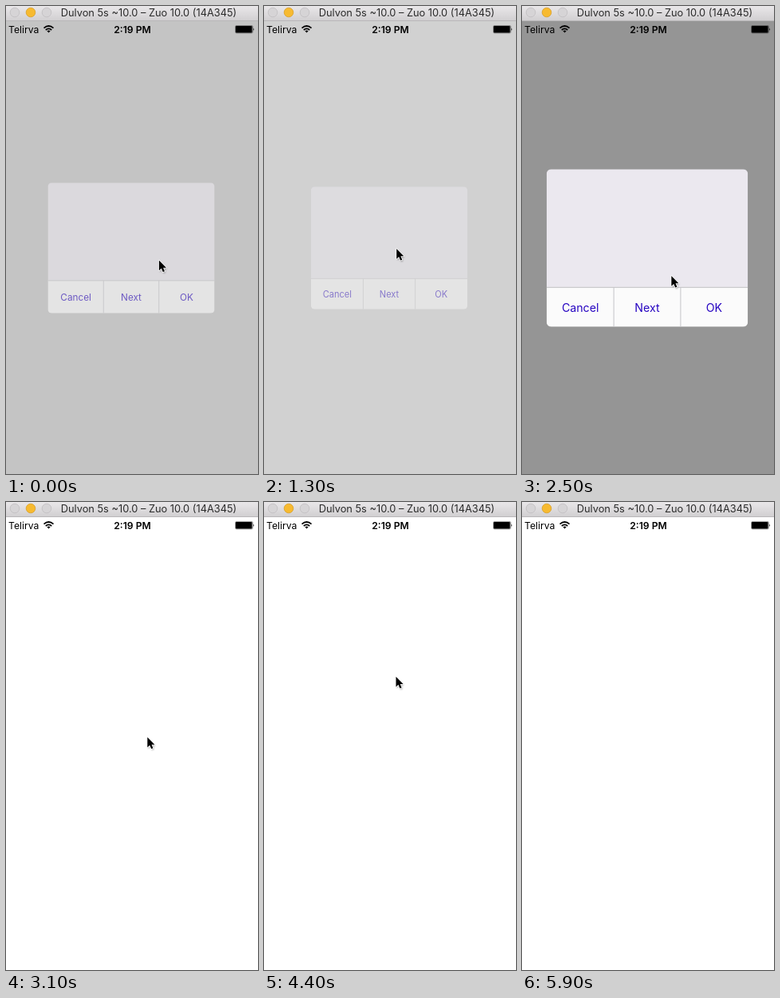
An HTML page for the animation above (6000 ms loop, 316 px wide and 586 px high).

```html
<!DOCTYPE html>
<html lang="en">
<head>
<meta charset="utf-8">
<title>Popup dialog</title>
<style>
html, body { margin: 0; width: 100%; height: 100%; overflow: hidden; background: #fff; }
svg { display: block; width: 316px; height: 586px; }
text { font-family: Inter, Roboto, sans-serif; text-anchor: middle; }
</style>
</head>
<body>
<svg viewBox="0 0 316 586">
  <defs>
    <linearGradient id="bar" x2="0" y2="1">
      <stop offset="0" stop-color="#e9e7e9"/>
      <stop offset="1" stop-color="#d0ced0"/>
    </linearGradient>
    <filter id="soft" x="-50%" y="-50%" width="200%" height="200%">
      <feGaussianBlur stdDeviation="1"/>
    </filter>
    <clipPath id="round"><rect x="-128" y="-100" width="256" height="200" rx="6"/></clipPath>
    <path id="arrow" d="M.5 .8V13.5L3.4 10.8L5.4 15.3L7.6 14.4L5.7 10H9.6Z"/>
  </defs>

  <rect width="316" height="586" fill="#fff"/>
  <rect id="dim" y="19" width="316" height="567"/>

  <g id="card">
    <g clip-path="url(#round)">
      <rect x="-128" y="-100" width="256" height="150" fill="#efecf3"/>
      <rect x="-128" y="50" width="256" height="50" fill="#fff"/>
      <path d="M-128 50H128M-42.5 50V100M42.5 50V100" stroke="#c6c6ca"/>
    </g>
    <g id="labels" font-size="14.4" fill="#2400c4"></g>
  </g>

  <rect width="316" height="19" fill="url(#bar)"/>
  <path d="M0 18.5H316" stroke="#b9b7b9"/>
  <g fill="#d6d4d6" stroke="#c0bec0" stroke-width=".8">
    <circle cx="11" cy="8" r="5.8"/>
    <circle cx="31" cy="8" r="5.8" fill="#f7ba30" stroke="#d9a02a"/>
    <circle cx="51" cy="8" r="5.8"/>
  </g>
  <text x="179" y="13" font-size="12.8" fill="#2a2a2a">Dulvon 5s ~10.0 – Zuo 10.0 (14A345)</text>

  <text x="3" y="34" font-size="12.2" style="text-anchor:start">Telirva</text>
  <g fill="none" stroke="#000" stroke-width="1.7">
    <path d="M47.5 27.6Q53.5 22.4 59.5 27.6M49.8 30Q53.5 26.8 57.2 30"/>
    <path d="M51.4 31.3Q53.5 29.6 55.6 31.3L53.5 33.6Z" fill="#000" stroke="none"/>
  </g>
  <text x="158.5" y="34" font-size="12.2" font-weight="600">2:19 PM</text>
  <rect x="287.5" y="24.5" width="22" height="9.4" rx="1.5" fill="none" stroke="#000" stroke-opacity=".45" stroke-width=".8"/>
  <rect x="288" y="25" width="20.6" height="8.4" rx=".8"/>
  <path d="M310.3 27.4Q312 29.2 310.3 31Z"/>

  <g id="cursor">
    <use href="#arrow" x="1" y="1.6" opacity=".4" filter="url(#soft)"/>
    <use href="#arrow" stroke="#fff" stroke-width="1.6" stroke-linejoin="round"/>
    <use href="#arrow"/>
  </g>
</svg>
<script>
const LOOP = 6000, STEP = 100, FADE = 180, TRAVEL = 300, CURSOR_END = 5600;
const $ = id => document.getElementById(id);

// Each showing of the dialog: when it opens and closes, and where the pointer taps
const shows = [
  { open: -95, close: 885, from: [180, 305], to: [228, 359] },
  { open: 1220, close: 2020, from: [155, 285], to: [216, 389] },
  { open: 2340, close: 2920, from: [150, 285], to: [217, 380] },
  { open: 3500, close: 4100, from: [155, 247], to: [226, 372] },
  { open: 4720, close: 5420, from: [165, 218], to: [226, 372] }
];

// Smooth 0 to 1 ramp
function ramp(t, start, length) {
  const p = Math.min(1, Math.max(0, (t - start) / length));
  return p * p * (3 - 2 * p);
}

const presence = t => shows.reduce(
  (sum, s) => sum + ramp(t, s.open, FADE) - ramp(t, s.close, FADE), 0);

function pointer(t) {
  return [0, 1].map(axis => shows.reduce((v, s, i) => {
    const next = shows[i + 1] || s;
    return v + (s.to[axis] - s.from[axis]) * ramp(t, s.open, TRAVEL)
             + (next.from[axis] - s.to[axis]) * ramp(t, s.close, TRAVEL);
  }, shows[0].from[axis]));
}

["Cancel", "Next", "OK"].forEach((name, i) => {
  const label = document.createElementNS("http://www.w3.org/2000/svg", "text");
  label.setAttribute("x", (i - 1) * 85);
  label.setAttribute("y", 81);
  label.textContent = name;
  $("labels").append(label);
});

function draw(time) {
  const t = Math.floor(time % LOOP / STEP) * STEP;
  const a = presence(t);
  const [x, y] = pointer(t);
  $("dim").setAttribute("opacity", .43 * a);
  $("card").setAttribute("opacity", a);
  $("card").setAttribute("transform", `translate(157 303) scale(${.6 + .4 * a})`);
  $("cursor").setAttribute("transform", `translate(${x} ${y})`);
  $("cursor").setAttribute("visibility", t < CURSOR_END ? "visible" : "hidden");
}

function tick() {
  draw(performance.now());
  requestAnimationFrame(tick);
}
tick();
</script>
</body>
</html>
```
